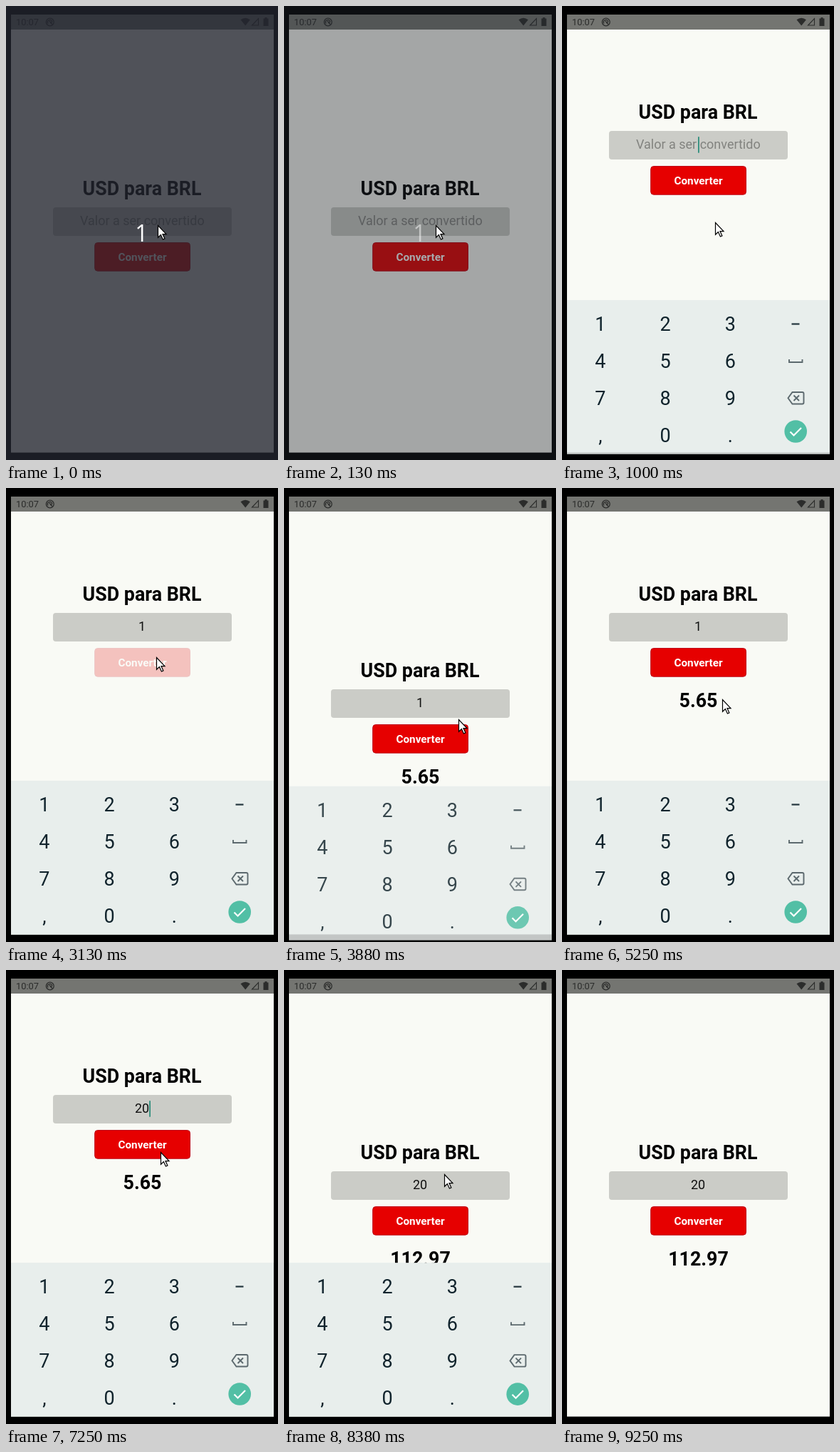
Animation of 382x636 px, one loop 9.62 s. Source, as an HTML page:

```html
<!DOCTYPE html>
<html lang="pt-BR">
<head>
<meta charset="utf-8">
<title>USD para BRL</title>
<style>
  html, body { margin: 0; width: 100%; height: 100%; overflow: hidden; background: #000; }
  svg { display: block; width: 382px; height: 636px; }
  text { font-family: Roboto, sans-serif; white-space: pre; }
  .mid { text-anchor: middle; }
  .bold { font-weight: 700; }
  #count { font-family: 'Open Sans', sans-serif; }
</style>
</head>
<body>
<svg viewBox="0 0 382 636">
  <rect width="382" height="636" fill="#000"/>
  <rect x="7" y="12" width="369" height="613.6" fill="#f9faf5"/>

  <g id="form" class="mid">
    <text class="bold" x="191" y="265.3" font-size="26.8">USD para BRL</text>
    <rect x="66" y="282" width="251" height="40" rx="4" fill="#cbccc7"/>
    <text id="hint" x="191.3" y="307.2" font-size="18" fill="#82837f">Valor a ser convertido</text>
    <text id="value" x="191" y="307.2" font-size="18" fill="#111"/>
    <rect id="caret" y="290.2" width="1.8" height="22.5" fill="#2f8f7d"/>
    <g id="button">
      <rect x="124.7" y="331.6" width="133.8" height="39.6" rx="4" fill="#e60000" stroke="#bd0010"/>
      <text class="bold" x="191.5" y="357" font-size="15.3" fill="#fff">Converter</text>
    </g>
    <text id="result" class="bold" x="191.5" y="413.8" font-size="26.8"/>
  </g>

  <g id="keyboard">
    <rect x="7" y="410" width="369" height="215.6" fill="#e8eeec"/>
    <g id="keys" class="mid" font-size="27" fill="#10232c"></g>
    <path d="M322.5 443.5h11" stroke="#24363e" stroke-width="2.2"/>
    <g fill="none" stroke="#5c696e" stroke-width="1.9">
      <path d="M319 493v4h18.500v-4"/>
      <path d="M323.500 539h14q2 0 2 2v12.500q0 2-2 2h-14l-6-8.250zM325.500 543.500l7.500 7.500m0-7.500l-7.500 7.500"/>
    </g>
    <circle cx="328.200" cy="594" r="15.800" fill="#52bfa5"/>
    <path d="M320.500 594.500l5 5 10.500-10.500" fill="none" stroke="#fff" stroke-width="2.200"/>
  </g>
  <rect id="spill" x="7" y="625.5" width="369" fill="#c3c7c6"/>

  <rect x="7" y="12" width="369" height="21" fill="#747571"/>
  <g fill="#2b2c2b">
    <text x="14" y="27.2" font-size="12.9">10:07</text>
    <g fill="none" stroke="#2b2c2b" stroke-width="1.3">
      <circle cx="61.8" cy="22.5" r="5.400"/>
      <path d="M59 24.500a3 3 0 0 1 5.500-3.500q.5 2.500-2.500 2.500M61 21l3.800 4.500"/>
    </g>
    <path d="M329.500 19.200q6.700-5 13.400 0l-6.700 8.300z"/>
    <path d="M345.500 27h9v-9.300z" fill="none" stroke="#2b2c2b" stroke-width="1.100"/>
    <path d="M361.500 17.500h2v-1.500h3v1.500h2v10.500h-7z"/>
  </g>

  <rect id="dim" width="382" height="636" fill="#23262f"/>
  <text id="count" class="mid" x="190.500" y="330" font-size="32" fill="#fff">1</text>
  <path id="mouse" d="M.5 .5v16.800l3.900-3.700 3 6.400 2.500-1.100-2.900-6.300h5z" fill="#fff" stroke="#000" stroke-width="1.200"/>
</svg>
<script>
const LOOP = 9620, STEP = 125, BLINK = 500, GLIDE = 250, EXIT = 9250;
const RATE = 5.6485;

// Two conversions: focus the field, keyboard opens, press the button, keyboard closes
const rounds = [
  { focus: 750, open: 875, press: 3125, close: 3720, fall: 250 },
  { focus: 4750, open: 4835, press: 7750, close: 8370, fall: 110 }
];
const edits = [[0, ''], [2750, '1'], [5625, ''], [7000, '2'], [7250, '20']];
// Pointer stops: arrival time, x, y
const stops = [[0, 213, 307], [750, 215, 303], [2875, 211, 237], [3375, 245, 324], [4500, 225, 296],
  [7125, 217, 255], [7500, 215, 246], [8125, 225, 286], [9125, 49, 7]];

const $ = id => document.getElementById(id);
const set = (id, attrs) => {
  for (const k in attrs) $(id).setAttribute(k, attrs[k]);
};
const ramp = (t, from, length) => Math.min(1, Math.max(0, (t - from) / length));
const lastEdit = t => edits.findLast(e => e[0] <= t);

// How far the keyboard is from its resting place: 0 open, 1 gone
function hidden(t) {
  const round = rounds.findLast(r => t >= r.open);
  if (!round) return 1;
  return t < round.close
    ? (1 - ramp(t, round.open, 250)) ** 3
    : ramp(t, round.close, round.fall) ** 1.5;
}

function caretOn(t) {
  const round = rounds.find(r => t >= r.focus && t < r.press);
  if (!round) return false;
  const since = Math.max(round.focus, lastEdit(t)[0]);
  return (t - since) % (2 * BLINK) < BLINK;
}

function pointer(t) {
  return stops.reduce(([x, y], [arrive, nx, ny]) => {
    const p = ramp(t, arrive - GLIDE, GLIDE);
    return [x + (nx - x) * p, y + (ny - y) * p];
  }, stops[0].slice(1));
}

function resultText(t) {
  const done = rounds.findLast(r => t >= r.press + 250);
  return done ? (lastEdit(done.press)[1] * RATE).toFixed(2) : '';
}

function buttonOpacity(t) {
  const round = rounds.findLast(r => t >= r.press);
  return round ? .22 + .78 * ramp(t, round.press, 250) : 1;
}

function draw(time) {
  const t = Math.floor(time / STEP) * STEP;
  const value = lastEdit(t)[1];
  const raised = rounds.some(r => t >= r.open && t < r.close);
  const away = hidden(t), drop = 16 * away, alpha = 1 - away ** 2.5;
  const fade = 1 - ramp(t, 0, 250);

  set('form', { transform: `translate(0 ${raised ? -107 : 0})` });
  set('hint', { opacity: value ? 0 : 1 });
  $('value').textContent = value;
  set('caret', { x: 191 + value.length * 5.1, opacity: caretOn(t) ? 1 : 0 });
  set('button', { opacity: buttonOpacity(t) });
  $('result').textContent = resultText(t);

  set('keyboard', { transform: `translate(0 ${drop})`, opacity: alpha });
  set('spill', { height: drop, opacity: alpha });
  set('dim', { opacity: .79 * fade });
  set('count', { opacity: fade });
  set('mouse', { transform: `translate(${pointer(t)})`, opacity: t < EXIT ? 1 : 0 });
}

['123', '456', '789', ',0.'].forEach((row, r) => [...row].forEach((key, c) => {
  const text = document.createElementNS('http://www.w3.org/2000/svg', 'text');
  text.textContent = key;
  text.setAttribute('x', 53.8 + c * 91.3);
  text.setAttribute('y', 453 + r * 52);
  $('keys').append(text);
}));

const start = performance.now();
function tick() {
  draw((performance.now() - start) % LOOP);
  requestAnimationFrame(tick);
}
draw(0);
requestAnimationFrame(tick);
</script>
</body>
</html>
```
